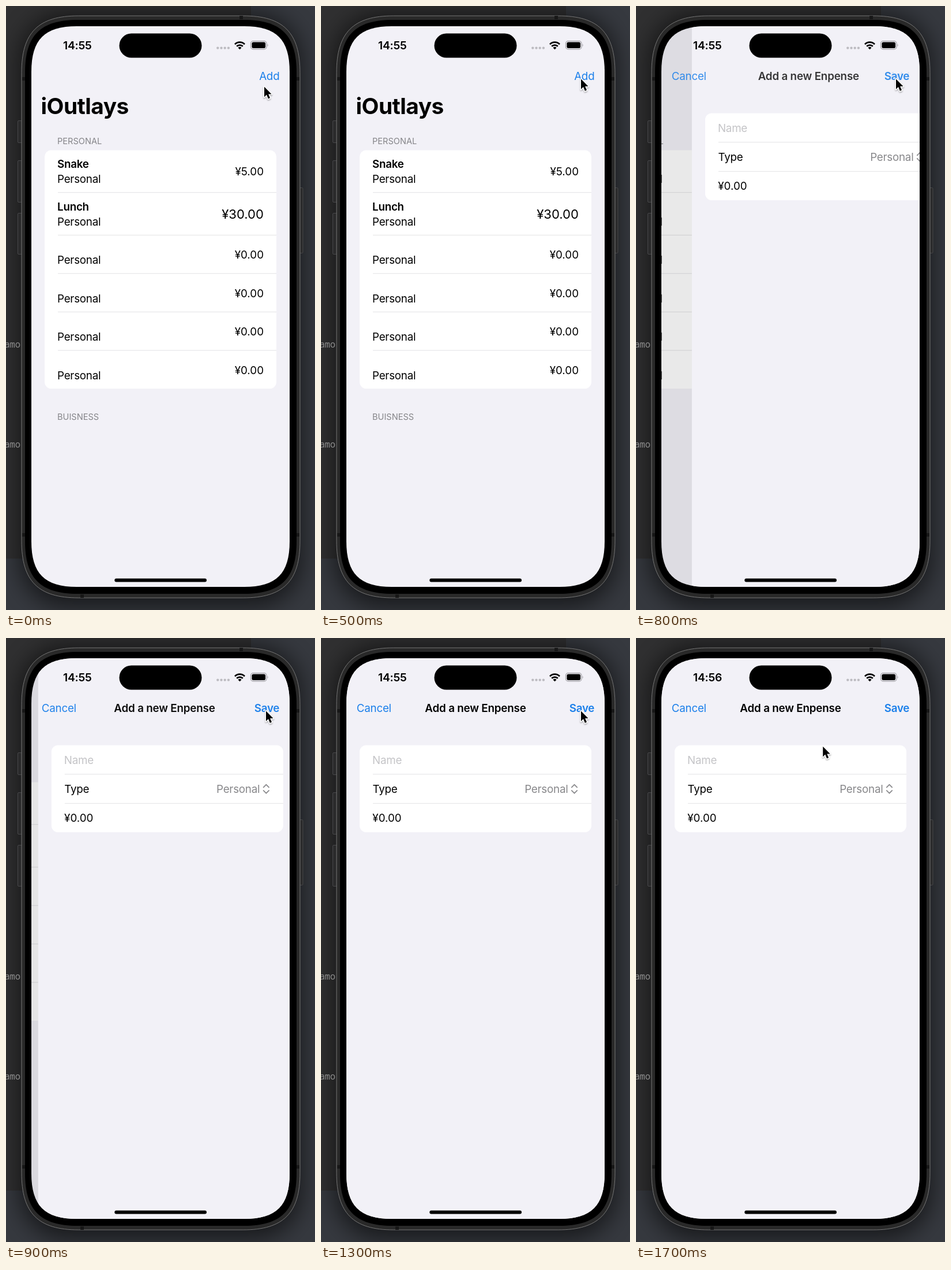
Animation, 536 px wide and 1045 px high, one loop 1800 ms. Source, as an HTML page:

```html
<!DOCTYPE html>
<html lang="en">
<head>
<meta charset="utf-8">
<title>Expense list</title>
<style>
  html, body { margin: 0; width: 100%; height: 100%; overflow: hidden; background: #34373e; }
  svg { display: block; width: 100vw; height: 100vh; }
  text { font: 18.8px Inter, "Liberation Sans", sans-serif; letter-spacing: -.013em; white-space: pre; }
  .bold { font-weight: 600; }
  .sum { letter-spacing: 0; }
  .head { font-size: 14.6px; letter-spacing: 0; fill: #858589; }
  .blue { fill: #1a7fea; }
  .end { text-anchor: end; }
  .code { font: 15.5px "Noto Sans Mono", monospace; fill: #8d8d8d; }
  .line { stroke: #e2e2e4; }
  .btn { fill: #2a2a2b; stroke: #48484a; }
</style>
</head>
<body>
<svg viewBox="0 0 536 1045">
  <defs>
    <clipPath id="screen"><path id="glass"/></clipPath>
    <filter id="blur" x="-20%" y="-10%" width="140%" height="120%"><feGaussianBlur stdDeviation="20"/></filter>
    <filter id="drop" x="-50%" y="-50%" width="200%" height="200%">
      <feDropShadow dx="0" dy="1.5" stdDeviation="1.3" flood-opacity=".35"/>
    </filter>
    <linearGradient id="fade" gradientUnits="userSpaceOnUse" x1="392" x2="417">
      <stop stop-color="#fff"/><stop offset="1" stop-color="#000"/>
    </linearGradient>
    <mask id="titleMask" maskUnits="userSpaceOnUse" x="44" y="95" width="448" height="50">
      <rect x="44" y="95" width="448" height="50" fill="url(#fade)"/>
    </mask>
  </defs>

  <!-- desktop behind the phone -->
  <rect width="536" height="1045" fill="#36393f"/>
  <rect width="425" height="956" fill="#303031"/>
  <rect x="24" y="14" width="488" height="1024" rx="80" opacity=".58" filter="url(#blur)"/>
  <text class="code" x="-2.5" y="591">amo</text>
  <text class="code" x="-2.5" y="763.5">amo</text>

  <!-- phone body -->
  <rect class="btn" x="20.5" y="198.5" width="9" height="38" rx="1.5"/>
  <rect class="btn" x="20.5" y="267.5" width="9" height="72" rx="1.5"/>
  <rect class="btn" x="20.5" y="358.5" width="9" height="71" rx="1.5"/>
  <rect class="btn" x="506.5" y="314.5" width="8.5" height="113" rx="1.5"/>
  <path id="body" fill="#292929" stroke="#767676"/>
  <path d="M28 126h5M504 126h5M28 915h5M504 915h5M405 20h6M129 1021h6" stroke="#171717" stroke-width="6"/>
  <path id="bezel"/>

  <g clip-path="url(#screen)">
    <rect x="44" y="35" width="448" height="970" fill="#f2f1f7"/>
    <g id="list">
      <text class="head" x="89" y="238.7">PERSONAL</text>
      <rect x="67" y="249.5" width="402" height="412.5" rx="11.5" fill="#fff"/>
      <g id="rows"></g>
      <text class="head" x="89" y="716.3">BUISNESS</text>
    </g>
    <rect id="dim" x="44" y="35" width="448" height="970"/>
    <text id="bigTitle" x="60.5" y="187.3" style="font-size:38.8px;font-weight:700">iOutlays</text>

    <g id="form">
      <rect x="44" y="35" width="448" height="970" fill="#f2f1f7"/>
      <rect x="67" y="185.5" width="402" height="150.5" rx="11.5" fill="#fff"/>
      <path class="line" d="M90 235.7H469M90 286.2H469"/>
      <text x="89" y="218.3" fill="#c4c4c7">Name</text>
      <text x="89.5" y="268.3">Type</text>
      <text class="end" x="428.5" y="268" fill="#88888b">Personal</text>
      <path d="M434.8 258.3l4.7-4.7 4.7 4.7M434.8 263.9l4.7 4.7 4.7-4.7" fill="none" stroke="#88888b" stroke-width="1.7" stroke-linecap="round" stroke-linejoin="round"/>
      <text class="sum" x="89.3" y="318.3">¥0.00</text>
    </g>

    <g id="oldBar"><text class="blue end" x="474.4" y="128">Add</text></g>
    <g id="newBar">
      <text class="blue" x="61.8" y="128">Cancel</text>
      <text class="blue bold end" x="474.2" y="128">Save</text>
    </g>
    <g mask="url(#titleMask)">
      <text id="title" class="bold" y="127.7" text-anchor="middle" style="letter-spacing:-.01em">Add a new Enpense</text>
    </g>
  </g>

  <!-- status bar -->
  <text id="clock" class="bold" x="99" y="75" style="font-size:19.3px"></text>
  <rect x="196.5" y="47.5" width="143" height="42" rx="21"/>
  <path d="M367.3 72.6h.01M373.5 72.6h.01M379.7 72.6h.01M385.9 72.6h.01" stroke="#bcbbc0" stroke-width="4.4" stroke-linecap="round"/>
  <path d="M397 66.2a12 12 0 0 1 17 0M400.2 69.8a7.5 7.5 0 0 1 10.6 0" fill="none" stroke="#000" stroke-width="2.7"/>
  <path d="M405.5 75.3l-3-3.1a4.3 4.3 0 0 1 6 0z"/>
  <rect x="424.5" y="60.7" width="27.5" height="14.2" rx="4.4" fill="none" stroke="#9f9ea3" stroke-width="1.2"/>
  <rect x="426.4" y="62.6" width="23.7" height="10.4" rx="2.8"/>
  <path d="M453.6 65.5q2 2.3 0 4.7z" fill="#9f9ea3"/>
  <rect x="188.3" y="990.5" width="159.7" height="6" rx="3"/>

  <path id="cursor" d="M0 0V17.6L4 13.8 6.9 20.6 10 19.3 7.1 12.6H12.6Z" stroke="#fff" stroke-width="3" stroke-linejoin="round" paint-order="stroke" filter="url(#drop)"/>
</svg>
<script>
const $ = id => document.getElementById(id);
const set = (id, attrs) => { for (const k in attrs) $(id).setAttribute(k, attrs[k]); };
const mix = (a, b, u) => a + (b - a) * u;
const smooth = u => { u = Math.min(1, Math.max(0, u)); return u * u * (3 - 2 * u); };

// rounded box whose corners ease into the straight sides
function softBox(x, y, w, h, r) {
  const e = 1.25 * r, c = e - .365 * r;
  return `M${x + e} ${y}h${w - 2 * e}c${c} 0 ${e} ${e - c} ${e} ${e}` +
    `v${h - 2 * e}c0 ${c} ${c - e} ${e} ${-e} ${e}` +
    `h${2 * e - w}c${-c} 0 ${-e} ${c - e} ${-e} ${-e}` +
    `v${2 * e - h}c0 ${-c} ${e - c} ${-e} ${e} ${-e}z`;
}
set("glass", { d: softBox(44, 35, 448, 970, 63) });
set("bezel", { d: softBox(33, 24, 471, 993, 73) });
set("body", { d: softBox(27, 17, 483, 1007, 79) });

function row(i) {
  const named = i < 2;
  const y = named ? i * 73.7 : 66.5 * i + 7.1;   // shift from the first named row
  const label = named ? 305.8 + y : 306 + y;
  const price = named ? 293.3 + y : 296.9 + y;
  const name = ["Snake", "Lunch"][i];
  const big = i == 1;
  return (named ? `<text class="bold" x="89" y="${280.2 + y}">${name}</text>` : "") +
    `<text x="89" y="${label}">Personal</text>` +
    `<text class="sum end" x="447" y="${price + (big ? 1 : 0)}"${big ? ' style="font-size:22.1px"' : ""}>` +
    `¥${["5", "30"][i] || 0}.00</text>` +
    (i < 5 ? `<path class="line" d="M90 ${322.7 + y}H469"/>` : "");
}
$("rows").innerHTML = [0, 1, 2, 3, 4, 5].map(row).join("");

function draw(t) {
  // critically damped push: left runs from 1 to 0
  const x = 18.3 * Math.max(0, t - 599) / 1000;
  const left = (1 + x) * Math.exp(-x), done = 1 - left;

  set("list", { transform: `translate(${-134.4 * done})` });
  set("dim", { opacity: .1 * done });
  set("bigTitle", { opacity: Math.max(0, (left - .33) / .67), transform: `translate(${34.5 * done})` });
  set("form", { transform: `translate(${448 * left})` });
  set("oldBar", { opacity: left });
  set("newBar", { opacity: done });
  set("title", { x: 268 + 265 * left, opacity: done * done });
  $("clock").textContent = t < 1600 ? "14:55" : "14:56";

  const up = smooth(t / 500), away = smooth((t - 1400) / 300);
  const cx = mix(mix(448, 451, up), 324.2, away);
  const cy = mix(mix(139.8, 126.3, up), 187.8, away);
  set("cursor", { transform: `translate(${cx} ${cy})` });
}

function tick(now) {
  draw(Math.floor(now % 1800 / 100) * 100);   // ten pictures a second
  requestAnimationFrame(tick);
}
draw(0);
requestAnimationFrame(tick);
</script>
</body>
</html>
```
